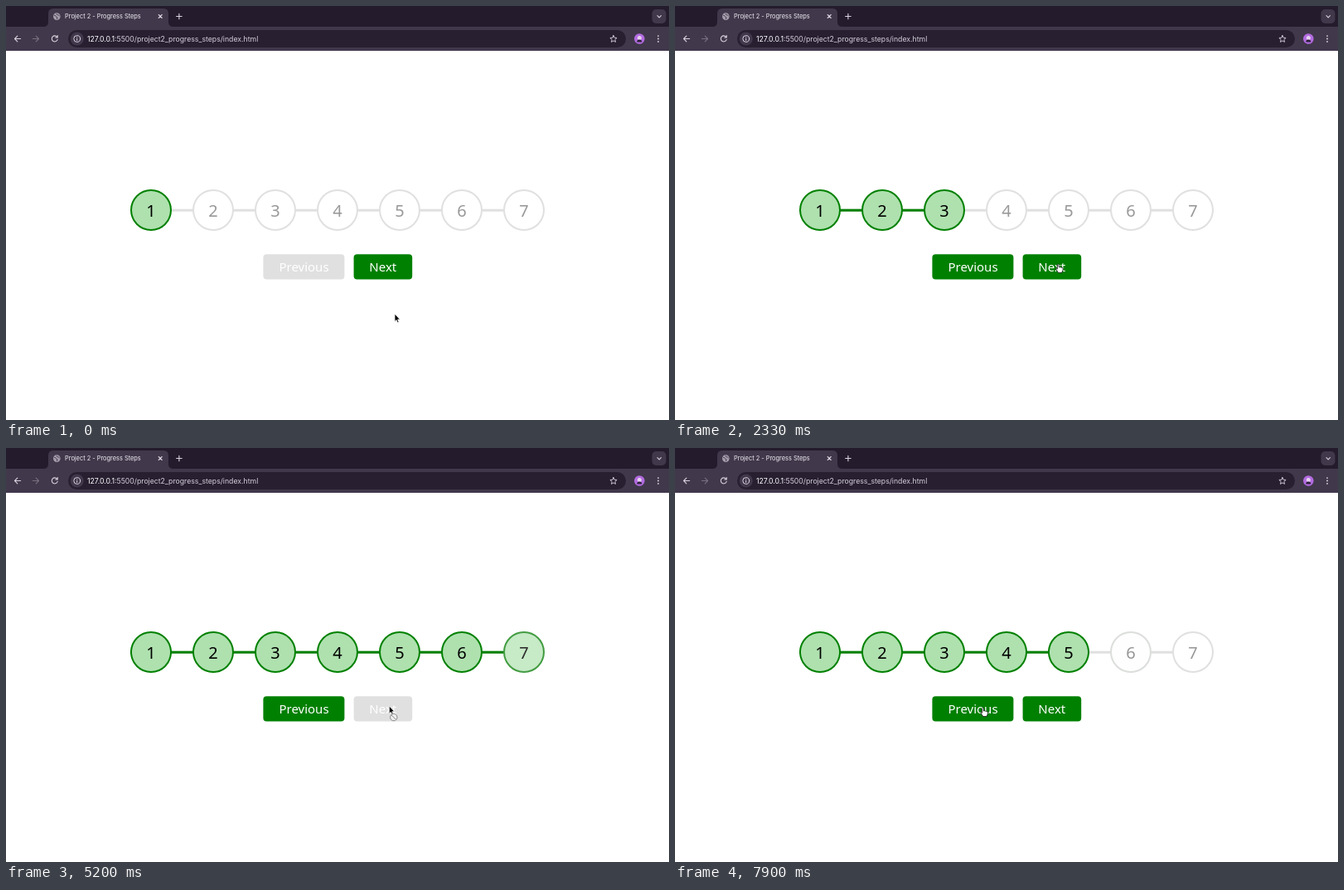
These frames come from a looping animation (800 by 499 pixels, 8000 ms). An HTML page:

```html
<!DOCTYPE html>
<html lang="en">
<head>
<meta charset="utf-8">
<title>Progress Steps</title>
<style>
  html, body { margin: 0; width: 100%; height: 100%; overflow: hidden; background: #fff; }
  svg { display: block; width: 100vw; height: 100vh; }
  .ui { font-family: Inter, Roboto, sans-serif; }
  .page { font-family: "Noto Sans", "Open Sans", sans-serif; text-anchor: middle; }
  .icon { fill: none; stroke: #d9d3df; stroke-width: 1.1; stroke-linecap: round; stroke-linejoin: round; }
</style>
</head>
<body>
<svg viewBox="0 0 800 499">
  <rect width="800" height="499" fill="#fff"/>

  <g class="ui">
    <rect width="800" height="54" fill="#241b2d"/>
    <path d="M45 25q6 0 6-6V9q0-6 6-6H190q6 0 6 6V19q0 6 6 6H800V54H0V25z" fill="#41384b"/>
    <rect x="75" y="29" width="673" height="21" rx="10.5" fill="#281f31"/>
    <rect x="779.5" y="4" width="17" height="17" rx="5" fill="#41384b"/>

    <circle cx="61.3" cy="12.6" r="4.3" fill="#a59dac"/>
    <path d="M58.2 11.4q1.8-.2 2.2 1.2t1.6 1.2q.2 1.4-1 2.2M61 9.2q.2 1.5 1.4 1.6t2.2 1.2" fill="none" stroke="#41384b"/>
    <text x="71" y="15.3" font-size="7.4" fill="#f1edf4">Project 2 - Progress Steps</text>
    <g class="icon">
      <path d="M184.2 10.5l4 4m0-4l-4 4M205.6 12.5h6.6m-3.3-3.3v6.6M786 11.6l2.2 2.2 2.2-2.2"/>
      <path d="M17.6 39.5h-7m3.2-3.3l-3.3 3.3 3.3 3.3"/>
      <path d="M32.4 39.5h7m-3.2-3.3l3.3 3.3-3.3 3.3" stroke="#786f81"/>
      <path d="M61.6 37.3a3.5 3.5 0 1 0 .6 3M62.2 35.6v2.4h-2.4"/>
      <circle cx="85.7" cy="39.5" r="8" fill="#41384b" stroke="none"/>
      <circle cx="85.7" cy="39.5" r="3.9" stroke-width="1"/>
      <path d="M85.7 39.3v2.1m0-3.8v.1" stroke-width="1"/>
      <path d="M733 35.5l1.2 2.7 2.9.3-2.2 2 .6 2.9-2.5-1.5-2.5 1.5.6-2.9-2.2-2 2.9-.3z" stroke-width=".9"/>
    </g>
    <text x="98" y="42.6" font-size="8.7" fill="#fff">127.0.0.1<tspan fill="#d6d0dc">:5500/project2_progress_steps/index.html</tspan></text>
    <circle cx="764.3" cy="39.5" r="6.3" fill="#b36be0"/>
    <circle cx="764.3" cy="38.4" r="2.5" fill="#e5d2ef"/>
    <path d="M761.5 43.6v-1.4q0-1.7 2.8-1.7t2.8 1.7v1.4z" fill="#2c2038"/>
    <g fill="#d9d3df">
      <circle cx="787" cy="36.1" r=".95"/><circle cx="787" cy="39.5" r=".95"/><circle cx="787" cy="42.9" r=".95"/>
    </g>
  </g>

  <g class="page">
    <rect x="150" y="244.7" width="500" height="3" fill="#e0e0e0"/>
    <rect id="bar" x="150" y="244.7" width="0" height="3" fill="#008000"/>
    <g id="steps" font-size="20"></g>
    <g id="prev" font-size="15">
      <rect x="310.4" y="299.2" width="98" height="30.2" rx="4"/>
      <text x="359.5" y="320" fill="#fff">Previous</text>
    </g>
    <g id="next" font-size="15">
      <rect x="419.6" y="299.2" width="70.6" height="30.2" rx="4"/>
      <text x="454.8" y="320" fill="#fff">Next</text>
    </g>
  </g>

  <g id="cursor" stroke-linejoin="round">
    <path id="hand" d="M-.9.9Q0-.5.9.9V4q.9-.7 1.7.2.9-.6 1.6.4 1.5-.4 1.7 1.2 0 2-.9 3.4L4.6 10.6H0Q-.8 8.8-2.3 7-3 5.8-1.9 5.5L-.9 6.3z" fill="#fff" stroke="#111" stroke-width=".8"/>
    <path id="arrow" d="M0 0V9.4L2.1 7.5 3.5 10.8 5.1 10.1 3.7 6.9H6.5z" fill="#000" stroke="#fff" stroke-width=".8"/>
    <g id="ban" fill="#eee" stroke="#8a8a8a">
      <circle cx="5.5" cy="13.8" r="4.2"/><path d="M2.6 10.9l5.8 5.8"/>
    </g>
  </g>
</svg>
<script>
const LOOP = 8000, FADE = 400;
const $ = id => document.getElementById(id);
const clamp = v => Math.max(0, Math.min(1, v));
const mix = (a, b, p) => a + (b - a) * p;
const rgb = (a, b, p) => `rgb(${a.map((v, i) => Math.round(mix(v, b[i], p)))})`;
const smooth = p => p * p * (3 - 2 * p);

// CSS "ease": cubic-bezier(.25, .1, .25, 1)
function ease(x) {
  if (x <= 0 || x >= 1) return clamp(x);
  let lo = 0, hi = 1, u = x;
  for (let i = 0; i < 18; i++) {
    u = (lo + hi) / 2;
    const bx = .75 * u * (1 - u) + u ** 3;
    if (bx < x) lo = u; else hi = u;
  }
  return .3 * u * (1 - u) ** 2 + 3 * u * u * (1 - u) + u ** 3;
}

// mouse down and up times
const nextPress = [[700, 815], [1900, 1960], [2700, 2800], [3470, 3530], [4100, 4160], [4830, 5035]];
const prevPress = [[6730, 6830], [7530, 7575]];
const onAt = [-LOOP, ...nextPress.map(p => p[1])];
const offAt = onAt.map((_, i) => i > 4 ? prevPress[6 - i][1] : Infinity);

// cursor moves: start, end of x, end of y, target
const moves = [
  [80, 520, 520, 462.3, 310.8],
  [5420, 5610, 5610, 468, 355],
  [5850, 6440, 6340, 371.6, 313]
];

const steps = onAt.map((_, i) => {
  const x = 175 + 75 * i;
  $("steps").insertAdjacentHTML("beforeend",
    `<circle cx="${x}" cy="246" r="24" stroke-width="2"/><text x="${x}" y="253.6">${i + 1}</text>`);
  const [text, ring] = [$("steps").lastChild, $("steps").lastChild.previousSibling];
  return { text, ring };
});

function drawButton(id, cx, presses, off, t) {
  const down = presses.some(([a, b]) => t >= a && t < b);
  $(id).setAttribute("transform", down ? `translate(${cx} 314.3) scale(.98) translate(${-cx} -314.3)` : "");
  $(id).firstElementChild.setAttribute("fill", off ? "#e0e0e0" : "#008000");
}

function drawCursor(t, prevOff, nextOff) {
  let x = 469, y = 371;
  for (const [t0, tx, ty, mx, my] of moves) {
    x = mix(x, mx, smooth(clamp((t - t0) / (tx - t0))));
    y = mix(y, my, smooth(clamp((t - t0) / (ty - t0))));
  }
  const row = y > 299 && y < 329.4;
  const onPrev = row && x > 310 && x < 408.4, onNext = row && x > 419.6 && x < 490.2;
  const banned = onPrev && prevOff || onNext && nextOff;
  const hand = (onPrev || onNext) && !banned;
  const show = (id, on) => $(id).setAttribute("visibility", on ? "visible" : "hidden");
  show("hand", hand);
  show("arrow", !hand);
  show("ban", banned);
  $("cursor").setAttribute("transform", `translate(${x} ${y})`);
}

function draw(t) {
  let width = 0;
  steps.forEach(({ ring, text }, i) => {
    const p = ease((t - onAt[i]) / FADE) - ease((t - offAt[i]) / FADE);
    ring.setAttribute("fill", rgb([255, 255, 255], [175, 225, 175], p));
    ring.setAttribute("stroke", rgb([224, 224, 224], [0, 128, 0], p));
    text.setAttribute("fill", rgb([153, 153, 153], [0, 0, 0], p));
    if (i) width += p * 500 / 6;
  });
  $("bar").setAttribute("width", width);
  const prevOff = t < onAt[1], nextOff = t >= onAt[6] && t < offAt[6];
  drawButton("prev", 359.4, prevPress, prevOff, t);
  drawButton("next", 454.9, nextPress, nextOff, t);
  drawCursor(t, prevOff, nextOff);
}

const start = performance.now();
function tick() {
  draw((performance.now() - start) % LOOP);
  requestAnimationFrame(tick);
}
tick();
</script>
</body>
</html>
```
